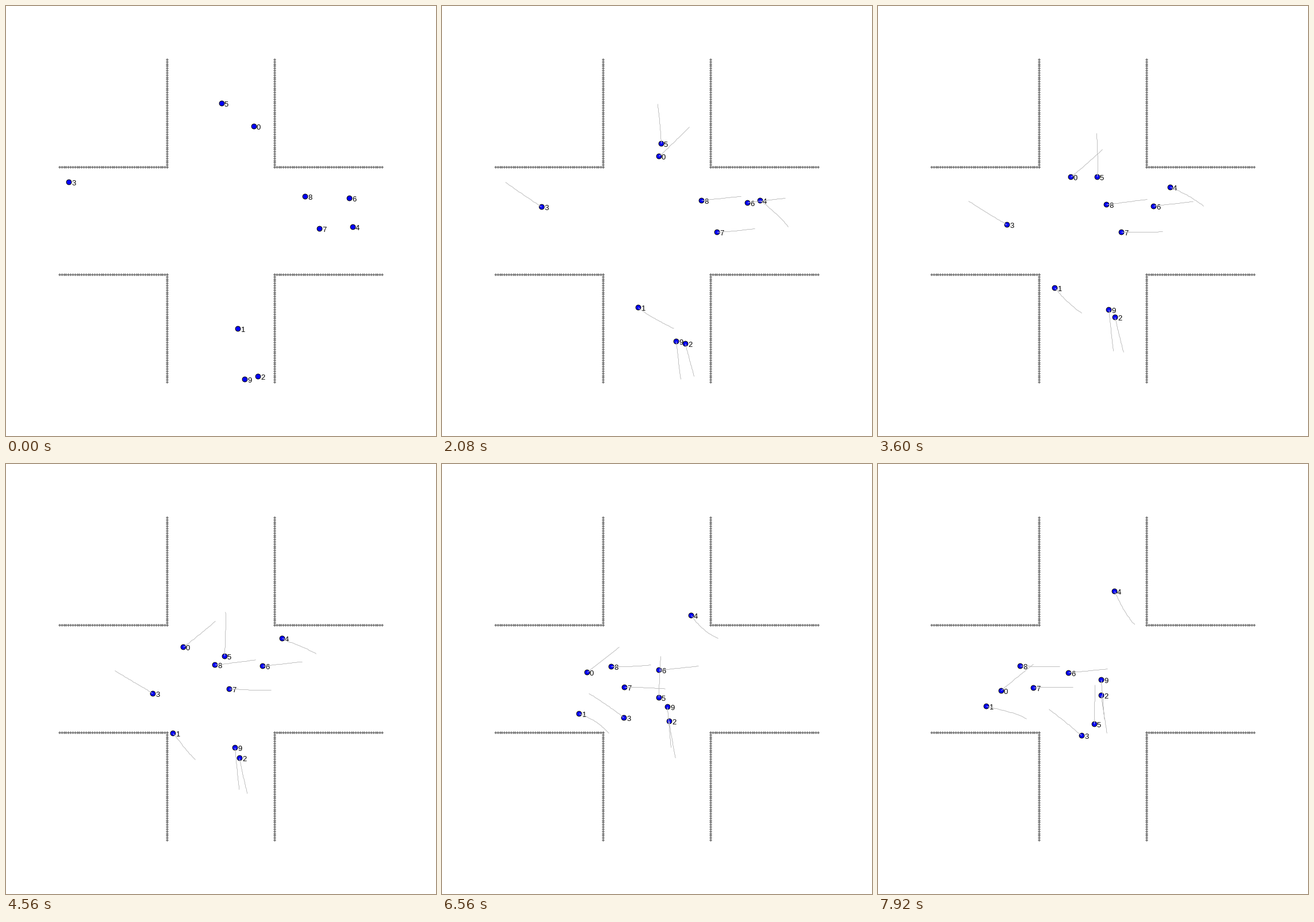
Animation of 748 by 748 pixels, one loop 8000 ms. Source, as a matplotlib script:

```python
import numpy as np
import matplotlib.pyplot as plt
from matplotlib.animation import FuncAnimation
from matplotlib.collections import PolyCollection
from matplotlib.patches import Circle

SIZE, DPI = 748, 68
PX = 72 / DPI
FRAMES, INTERVAL = 100, 80
TRAIL = 25
START_LAG = 2.0

# Complex pixel positions: start, end, bow (one arc), swerve (an S-shaped arc).
WALKERS = [
    (431.5 + 210j, 214.5 + 394.5j, 5.7j, 2.3j),
    (404 + 561.5j, 188.5 + 422j, 4 - 11.5j, -12 + 6j),
    (439 + 645j, 388.5 + 403j, -4 + 4.3j, 0),
    (110 + 306.5j, 355 + 473j, 6.5 - 0.4j, -1 + 2.6j),
    (603.5 + 385j, 411.5 + 221.5j, -11.5 + 7.5j, 5.5 - 11j),
    (375.5 + 170j, 376.5 + 452.5j, 5.5 + 3.2j, 2 - 2.6j),
    (598 + 334.5j, 331.5 + 363.5j, 1j, 0),
    (545.5 + 387.5j, 270.5 + 389.5j, 4j, 1.2 + 3j),
    (521 + 331.5j, 247.5 + 351.5j, -2 + 6.3j, -2j),
    (415.5 + 650j, 388.5 + 376j, -1.5, 1.5j),
]


def pixel_centre(value):
    return np.floor(value) + 0.5


def walk(start, end, bow, swerve):
    """Steady walk after a soft start, bent sideways; one row per frame."""
    step = np.arange(FRAMES)
    done = step - START_LAG * (1 - np.exp(-step / START_LAG))
    u = done / done[-1]
    z = (start + (end - start) * u
         + bow * np.sin(np.pi * u) + swerve * np.sin(2 * np.pi * u))
    return pixel_centre(np.column_stack([z.real, z.imag]) - 0.25)


fig = plt.figure(figsize=(SIZE / DPI, SIZE / DPI), dpi=DPI, facecolor="white")
ax = fig.add_axes([0, 0, 1, 1])
ax.set_xlim(0, SIZE)
ax.set_ylim(SIZE, 0)
ax.axis("off")


def draw_walls():
    near = pixel_centre(np.linspace(SIZE / 8, SIZE * 3 / 8, 50))
    far = pixel_centre(np.linspace(SIZE * 5 / 8, SIZE * 7 / 8, 50))
    diamond = 2.5 * np.array([(1, 0), (0, 1), (-1, 0), (0, -1)])
    posts = []
    for run in (near, far):
        for level in (near[-1], far[0]):
            for p in run:
                posts += [diamond + (p, level), diamond + (level, p)]
    ax.add_collection(PolyCollection(posts, facecolor="#808080", linewidth=0))


draw_walls()
tracks = [walk(*walker) for walker in WALKERS]
dots, labels, trails = [], [], []
for i in range(len(tracks)):
    z = 3 + i / 50
    dots.append(ax.add_patch(Circle((0, 0), 4.4, fc="#0000ff", ec="black",
                                    lw=PX, zorder=z)))
    labels.append(ax.text(0, 0, str(i), family="Liberation Sans", size=13 * PX,
                          color="black", ha="left", va="baseline", zorder=z + 0.01))
    trails.append(ax.plot([], [], color="#c0c0c0", lw=PX,
                          solid_capstyle="butt", zorder=5)[0])


def update(step):
    for track, dot, label, trail in zip(tracks, dots, labels, trails):
        x, y = track[step]
        dot.center = x, y
        label.set_position((x + 4.5, y + 5.5))
        trail.set_data(*track[max(0, step - TRAIL):step + 1].T)
    return dots + labels + trails


anim = FuncAnimation(fig, update, frames=FRAMES, interval=INTERVAL,
                     repeat=True, repeat_delay=0, blit=False)
plt.show()
```
